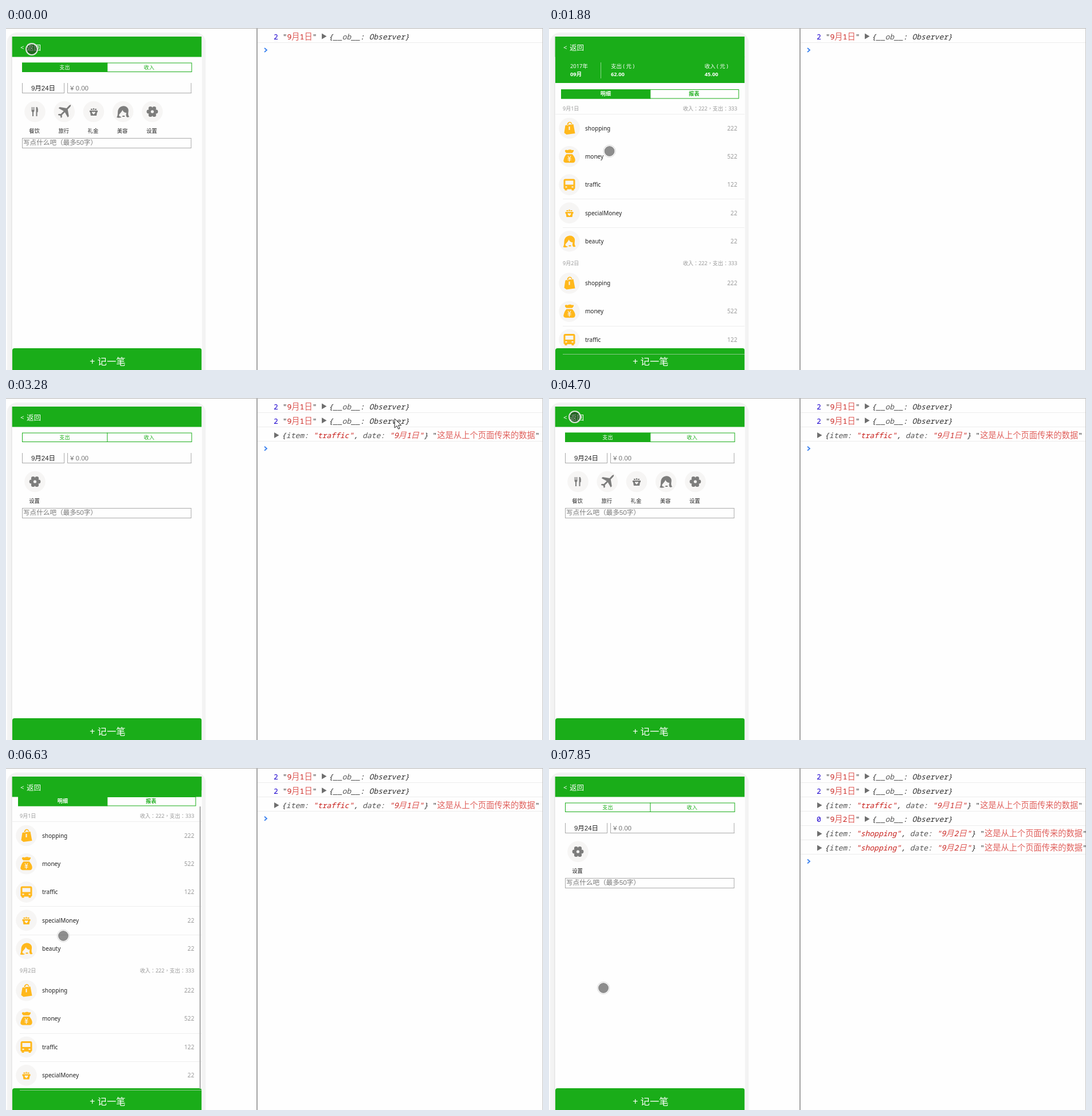
An HTML page with a canvas for the animation above (8 s loop, 937 by 597 pixels).

```html
<!DOCTYPE html>
<html lang="zh">
<head>
<meta charset="utf-8">
<title>记账</title>
<style>
html, body { margin: 0; width: 100%; height: 100%; overflow: hidden; background: #fefefe; }
canvas { display: block; }
</style>
</head>
<body>
<canvas id="stage" width="937" height="597"></canvas>
<script>
const stage = document.getElementById('stage').getContext('2d');
// Pages are painted here first, so that each one fades as a whole
const layer = Object.assign(document.createElement('canvas'), { width: 937, height: 597 }).getContext('2d');
let ctx = stage;

const LOOP = 8000;
const GREEN = '#1aad19', GREY = '#7d7d7c', AMBER = '#ffb81c', PAPER = '#fefefe';
const UI = '"Noto Sans", "Noto Sans CJK SC", "Noto Sans CJK", sans-serif';
const CENTRED = '"Noto Sans", "Noto Sans CJK TC", "Noto Sans CJK", sans-serif';
const INPUT = '"Liberation Sans", "Noto Sans CJK SC", "Noto Sans CJK", sans-serif';
const MONO = '"Noto Sans Mono", monospace';
const HAN = '"Noto Sans CJK SC", "Noto Sans CJK", sans-serif';

// The screen refreshes in bursts: [first, last, refreshes]
const BURSTS = [[150, 1100, 7], [1220, 2150, 8], [2280, 2430, 2], [2710, 3710, 8],
  [3860, 4700, 7], [5820, 6760, 8], [6880, 7850, 7]];
// Page visits: [start, page]
const VISITS = [[-2000, 'form'], [1100, 'list'], [2600, 'form'], [5620, 'list'], [6760, 'form']];
// Pointer path: [time, x, y]
const PATH = [[0, 45, 37], [150, 90, 38], [440, 640, 45], [620, 663, 46], [780, 560, 42],
  [1000, 80, 38], [1100, 45, 37], [1480, 45, 37], [1880, 106, 214], [2150, 76, 277],
  [2430, 76, 290], [2990, 76, 290], [3280, 678, 36], [3420, 690, 45], [3710, 836, 112],
  [3860, 800, 98], [4140, 640, 70], [4430, 200, 42], [4700, 45, 33], [5820, 45, 32],
  [6090, 45, 32], [6360, 100, 293], [6630, 100, 293], [6760, 95, 384], [LOOP, 95, 384]];

const ICONS = {
  bag: 'M-9 8-7-5-3-6 7-7 10 9-5 11ZM-1-3V3H1V-3ZM-4-5C-4-13 5-13 5-6H4C3-11-2-11-2-5Z',
  money: 'M-5-6C-10-10-7-13-3-11 0-13 3-12 5-11 9-12 8-9 5-6ZM-5-4H5C9 0 11 5 10 8 9 11 7 11 5 11H-5C-8 11-11 10-10 6-9 2-8-1-5-4Z' +
    'M-3-1-1 3H-3V4H-.6V5.5H-3V6.5H-.6V9H.6V6.5H3V5.5H.6V4H3V3H1L3-1H1.8L0 2.4-1.8-1Z',
  bus: 'M-7-10H7Q10-10 10-7V6Q10 8 8 8V10H4V8H-4V10H-8V8Q-10 8-10 6V-7Q-10-10-7-10ZM-7-7V0H7V-7ZM-7 3V5H-4V3ZM4 3V5H7V3Z',
  gift: 'M-7-2H7V1H6L5 7H-5L-6 1H-7ZM0 5 3 2C3 0 1 0 0 1-1 0-3 0-3 2ZM-5-3V-5H-2V-3ZM-1-3V-6H1V-3ZM2-3V-5H5V-3Z',
  beauty: 'M-11 10C-8 6-10 0-8-4-5-11 6-12 9-5 11 0 7 4 11 9L8 10C5 9 5 6 6 2 3 2 0 0-1-3-2 1-6 3-7 6-7 8-5 9-3 9V10C-6 11-9 11-11 10ZM-1 7H3V9H-1Z',
  meal: 'M-6-8H-5V-3H-4V-8H-3V-3H-2V-8H-1V-2Q-1 0-2.5 1V8H-4.5V1Q-6 0-6-2ZM2-8H4Q6-5 5 1H4V8H2Z',
  trip: 'M11-12C13-10 8-6 6-4L8 8 6 10 1 1-4 6-4 10-6 11-7 7-11 6-10 4-6 4-1-1-10-6-8-8 4-6C6-8 9-12 11-12Z'
};
for (const name in ICONS) ICONS[name] = new Path2D(ICONS[name]);
ICONS.gear = new Path2D();
ICONS.gear.arc(0, 0, 7, 0, 7);
for (let i = 0; i < 6; i++) {
  const a = i * Math.PI / 3, x = 6.5 * Math.cos(a), y = 6.5 * Math.sin(a);
  ICONS.gear.moveTo(x, y);
  ICONS.gear.arc(x, y, 3.4, 0, 7);
}
const ARROW = new Path2D('M0 0V16L4 12.5 6.5 18 9 17 6.5 11.5H11.5Z');

const clamp = v => Math.max(0, Math.min(1, v));
const smooth = v => { v = clamp(v); return v * v * (3 - 2 * v); };

function refreshTime(t) {
  let shown = 0;
  for (const [first, last, count] of BURSTS) {
    if (t + 8 < first) break;
    const step = (last - first) / (count - 1);
    shown = first + step * Math.min(count - 1, Math.floor((t + 8 - first) / step));
  }
  return shown;
}

function pointerAt(t) {
  const i = Math.max(1, PATH.findIndex(p => p[0] >= t));
  const [a, b] = [PATH[i - 1], PATH[i]];
  const k = clamp((t - a[0]) / (b[0] - a[0]));
  return [a[1] + (b[1] - a[1]) * k, a[2] + (b[2] - a[2]) * k];
}

function rect(x, y, w, h, color) {
  ctx.fillStyle = color;
  ctx.fillRect(x, y, w, h);
}

function frame(x, y, w, h, color) {
  ctx.strokeStyle = color;
  ctx.lineWidth = 1;
  ctx.strokeRect(x + .5, y + .5, w - 1, h - 1);
}

function rounded(x, y, w, h, radii, color) {
  ctx.fillStyle = color;
  ctx.beginPath();
  ctx.roundRect(x, y, w, h, radii);
  ctx.fill();
}

// y is the optical middle of the line
function text(str, x, y, size, color, align = 'left', weight = 400, family = UI) {
  ctx.font = `${weight} ${size}px ${family}`;
  ctx.fillStyle = color;
  ctx.textAlign = align;
  ctx.fillText(str, x, y + size * .36);
}

function disc(x, y, r, color) {
  ctx.fillStyle = color;
  ctx.beginPath();
  ctx.arc(x, y, r, 0, 7);
  ctx.fill();
}

function icon(name, x, y, color) {
  disc(x, y, 18.3, '#f6f5f4');
  ctx.save();
  ctx.translate(x, y);
  ctx.fillStyle = color;
  ctx.fill(ICONS[name], name === 'gear' ? 'nonzero' : 'evenodd');
  if (name === 'gear') disc(0, 0, 2.6, '#f6f5f4');
  ctx.restore();
}

function tabs(left, right, y, labels, selected, weight) {
  const mid = (left + right) / 2 + .5;
  frame(left, y, right - left, 16.5, GREEN);
  rect(mid - .5, y, 1, 16.5, GREEN);
  if (selected) rect(left, y, mid - left, 16.5, GREEN);
  text(labels[0], (left + mid) / 2, y + 8, 9, selected ? '#fff' : GREEN, 'center', weight);
  text(labels[1], (mid + right) / 2 - 1, y + 8, 9, GREEN, 'center', weight);
}

function addButton(right, y) {
  rounded(11, y, right - 11, 60, [4, 4, 0, 0], GREEN);
  text('+ 记一笔', (right + 11) / 2 + 1, y + 23, 16.3, '#fff', 'center');
}

function drawForm(right, loaded) {
  tabs(28, right - 17, 60.5, ['支出', '收入'], loaded);
  for (const [a, b] of [[28, 102], [107, right - 18]]) {
    rect(a, 96, 1, 18, '#aaa');
    rect(b - 1, 96, 1, 18, '#aaa');
    rect(a, 113, b - a, 1, '#aaa');
  }
  text('9月24日', 65, 105, 11.5, '#222', 'center', 400, INPUT);
  text('¥ 0.00', 112, 105, 11.5, '#777', 'left', 400, INPUT);
  const all = [['meal', '餐饮'], ['trip', '旅行'], ['gift', '礼金'], ['beauty', '美容'], ['gear', '设置']];
  (loaded ? all : all.slice(4)).forEach(([name, label], i) => {
    icon(name, 50.5 + 51.2 * i, 146, GREY);
    text(label, 49.5 + 51.2 * i, 180, 9.3, '#222', 'center');
  });
  frame(28, 192, right - 46, 18, '#aaa');
  text('写点什么吧（最多50字）', 30, 200, 11.6, '#777', 'left', 400, INPUT);
  addButton(right, 559);
}

function drawList(right, scroll, buttonY) {
  ctx.save();
  ctx.translate(0, -scroll);
  rect(11, 50, right - 11, 46, GREEN);
  rect(90, 60, 1, 28, '#8cd68b');
  text('2017年', 37, 67, 9.4, '#fff');
  text('09月', 37, 81, 9.4, '#fff', 'left', 700);
  text('支出 ( 元 )', 108, 67, 9.4, '#fff');
  text('62.00', 108, 81, 9.2, '#fff', 'left', 700);
  text('收入 ( 元 )', right - 70, 67, 9.4, '#fff');
  text('45.00', right - 70, 81, 9.2, '#fff', 'left', 700);
  tabs(21, right - 10, 107, ['明细', '报表'], true, 700);
  const rows = [['bag', 'shopping', 222], ['money', 'money', 522], ['bus', 'traffic', 122],
    ['gift', 'specialMoney', 22], ['beauty', 'beauty', 22]];
  ['9月1日', '9月2日'].forEach((day, g) => {
    const top = 140.5 + 270.5 * g;
    text(day, 24, top, 9, '#999');
    text('收入：222，支出：333', right - 13, top, 9.1, '#999', 'right', 400, CENTRED);
    rows.forEach(([name, label, amount], i) => {
      const y = top + 34.5 + 49.3 * i;
      icon(name, 35.5, y, AMBER);
      text(label, 63, y, 10, '#222');
      text(amount, right - 13, y, 10.2, '#999', 'right');
    });
  });
  ctx.restore();
  addButton(right, buttonY);
  for (const y of [150, 298, 348, 520, 569, 619]) {
    const left = y === 150 ? 11 : 24;
    rect(left, y - scroll, right - left, 1, 'rgba(225,225,225,.55)');
  }
  if (scroll) rounded(337.5, 67, 2.5, 493, 1, '#b5b5b5');
}

function drawPage(page, t, dx, shrink, alpha) {
  if (alpha <= 0) return;
  const right = 341.5 - shrink, moving = alpha < 1;
  ctx = layer;
  ctx.clearRect(0, 0, 937, 597);
  ctx.save();
  ctx.translate(Math.round(dx), 0);
  if (page === 'form') drawForm(right, t < 2600 || (t > 3500 && t < 6760));
  else drawList(right, moving ? 0 : 57 * smooth((t - 6350) / 250), moving ? 595 : 559);
  ctx.restore();
  ctx = stage;
  ctx.globalAlpha = alpha;
  ctx.drawImage(layer.canvas, 0, 0);
  ctx.globalAlpha = 1;
}

function drawPhone(t) {
  rounded(2, 8, 346.5, 620, 17, '#f3f3f3');
  rect(10, 15, 332, 582, PAPER);
  rect(9.5, 15, 1, 582, '#dcdcdc');
  ctx.save();
  ctx.beginPath();
  ctx.rect(10.5, 15, 331, 582);
  ctx.clip();
  let i = VISITS.length - 1;
  while (VISITS[i][0] > t) i--;
  const age = t - VISITS[i][0];
  const leave = smooth((age + 70) / 500), wait = 1 - smooth(age / 500);
  if (i) drawPage(VISITS[i - 1][1], t, -314 * leave, 87 * leave, 1 - leave);
  drawPage(VISITS[i][1], t, 208 * wait, 181 * wait, 1 - wait);
  rect(10.5, 15, 331, 35.5, GREEN);
  text('<', 25, 34, 11.5, '#fff');
  text('返回', 36, 34, 12.5, '#fff');
  ctx.restore();
}

const INK = '#303030', KEY = '#565656', RED = '#c8201c', PALE_RED = '#e0605c';

// Writes [string, color] pieces in a row; Han characters are larger and paler
function codeLine(x, y, pieces, style = '') {
  ctx.textAlign = 'left';
  for (const [str, color] of pieces) {
    for (const run of str.match(/[\u2e80-\uffff]+|[^\u2e80-\uffff]+/g)) {
      const han = /[\u2e80-\uffff]/.test(run);
      ctx.font = han ? `${style} 300 14.25px ${HAN}` : `${style} 13.05px ${MONO}`;
      ctx.fillStyle = han ? PALE_RED : color;
      ctx.fillText(run, x, y + 4.5);
      x += ctx.measureText(run).width;
    }
  }
  return x;
}

function triangle(x, y) {
  ctx.fillStyle = '#6e6e6e';
  ctx.fill(new Path2D(`M${x} ${y - 5}l8.5 5-8.5 5z`));
}

function logObserver(y, index, day) {
  codeLine(467, y, [[index, '#1c00cf'], [' "', INK], [day, RED], ['"', INK]]);
  triangle(551, y - 1);
  codeLine(563, y, [['{', INK], ['__ob__', KEY], [': Observer}', INK]], 'italic');
}

function logQuery(y, item, day) {
  triangle(468, y);
  const end = codeLine(481, y, [['{', INK], ['item: ', KEY], [`"${item}"`, RED], [', ', INK],
    ['date: ', KEY], [`"${day}"`, RED], ['}', INK]], 'italic');
  codeLine(end, y, [[' "', INK], ['这是从上个页面传来的数据', RED], ['"', INK]]);
}

const LOG = [
  [-1, y => logObserver(y, '2', '9月1日')],
  [2600, y => logObserver(y, '2', '9月1日')],
  [2840, y => logQuery(y, 'traffic', '9月1日')],
  [6760, y => logObserver(y, '0', '9月2日')],
  [7000, y => logQuery(y, 'shopping', '9月2日')],
  [7000, y => logQuery(y, 'shopping', '9月2日')]
];

function drawConsole(t) {
  rect(437, 0, 2, 597, '#a3a3a3');
  rect(0, 0, 937, 1, '#b5b5b5');
  rect(936, 0, 1, 597, '#c4c4c4');
  const lines = LOG.filter(line => line[0] <= t);
  lines.forEach(([, write], i) => {
    write(15.5 + 24.8 * i);
    rect(439, Math.round(25.4 + 24.9 * i), 497, 1, '#ececec');
  });
  ctx.strokeStyle = '#3b82f0';
  ctx.lineWidth = 1.8;
  ctx.stroke(new Path2D(`M451 ${10.1 + 24.9 * lines.length}l4 3.5-4 3.5`));
}

function ring(x, y, r, width, color) {
  ctx.lineWidth = width;
  ctx.strokeStyle = color;
  ctx.beginPath();
  ctx.arc(x, y, r, 0, 7);
  ctx.stroke();
}

function drawPointer(t) {
  const [x, y] = pointerAt(t);
  if (x < 348) {
    disc(x, y, 9.3, 'rgba(40,40,40,.53)');
    ring(x, y, 10, 2, 'rgba(255,255,255,.92)');
    ring(x, y, 10.6, .6, 'rgba(90,90,90,.4)');
  } else {
    ctx.save();
    ctx.translate(x, y);
    ctx.fillStyle = '#fff';
    ctx.strokeStyle = '#222';
    ctx.lineWidth = 1;
    ctx.fill(ARROW);
    ctx.stroke(ARROW);
    ctx.restore();
  }
}

function draw(now) {
  const t = refreshTime(now % LOOP);
  rect(0, 0, 937, 597, PAPER);
  drawPhone(t);
  drawConsole(t);
  drawPointer(t);
  requestAnimationFrame(draw);
}
requestAnimationFrame(draw);
</script>
</body>
</html>
```
